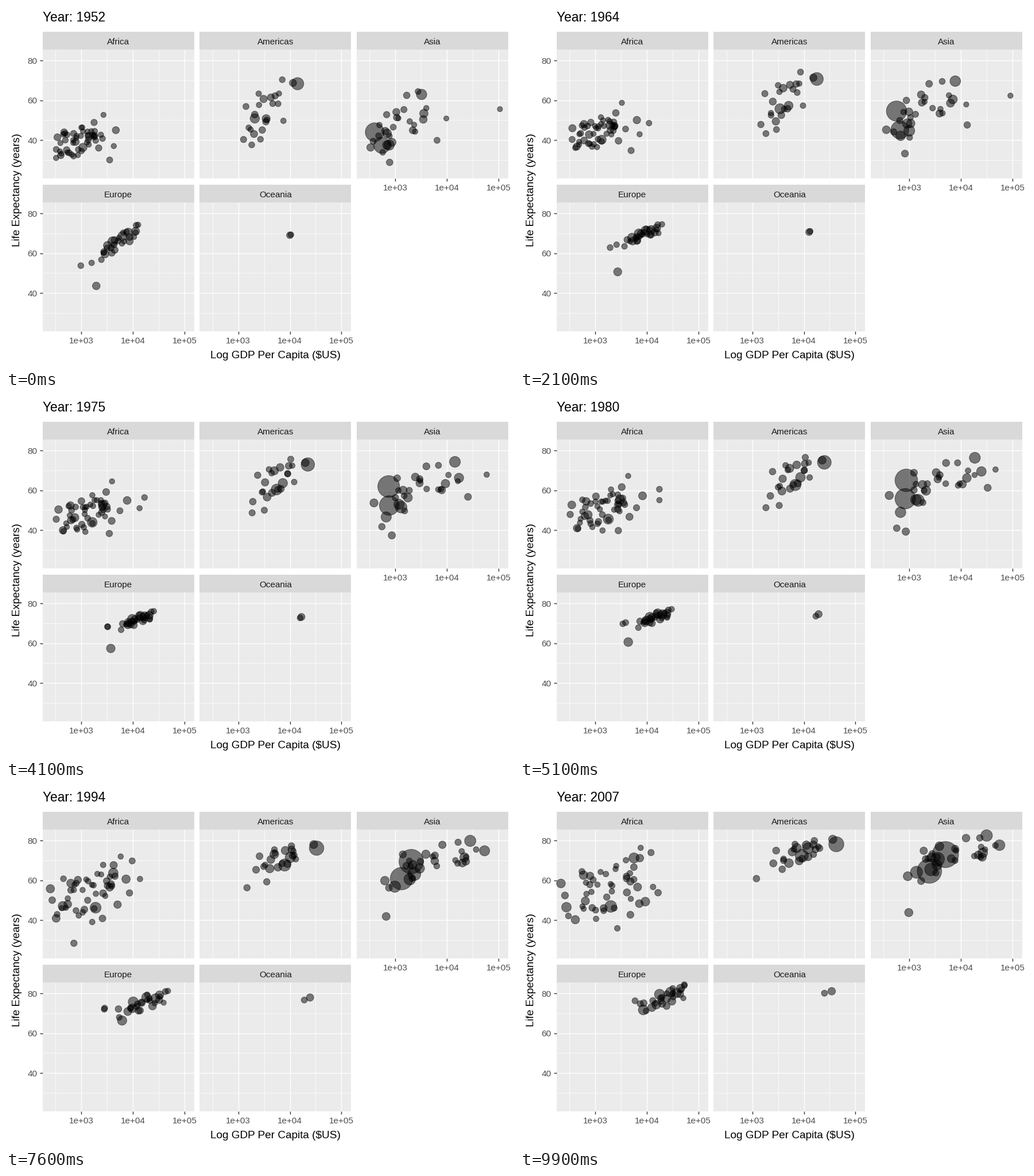
Recreate the animation shown at these times as a matplotlib script. Size 885x632 px, loop 10 s.

```python
import matplotlib.pyplot as plt
import numpy as np
from matplotlib.animation import FuncAnimation
from matplotlib.patches import Rectangle

W, H, DPI = 885, 632, 64
PT = 72 / DPI  # points per pixel
FRAMES = 100
PANEL_W, PANEL_H = 264, 224.7
LEFT, TOP, STEP_X, STEP_Y = 63.75, 76.2, 273.5, 267
STRIP = 31.6
LOG_MIN, DECADE = 2.2487, 89.8
LIFE_MAX, PER_YEAR = 85.553, 3.467
MAX_POP = 1318.7  # millions

rng = np.random.default_rng(5)
years = np.linspace(1952, 2007, FRAMES)
surveys = np.arange(1952, 2008, 5)
xs, ys, radii = [], [], []

plt.rcParams["font.family"] = "Liberation Sans"
fig = plt.figure(figsize=(W / DPI, H / DPI), dpi=DPI, facecolor="white")
ax = fig.add_axes([0, 0, 1, 1])
ax.set(xlim=(0, W), ylim=(H, 0))
ax.axis("off")


def map_x(col, log_gdp):
    return LEFT + col * STEP_X + (log_gdp - LOG_MIN) * DECADE


def map_y(row, life):
    return TOP + row * STEP_Y + (LIFE_MAX - life) * PER_YEAR


def text(x, y, s, size, color="black", ha="center", va="baseline", **kw):
    return ax.text(x, y, s, fontsize=size * PT, color=color, ha=ha, va=va, **kw)


def line(x, y, color, width, z):
    ax.plot(x, y, color=color, lw=width * PT, zorder=z, solid_capstyle="butt")


def box(x, y, w, h, color):
    ax.add_patch(Rectangle((x, y), w, h, fc=color, lw=0, zorder=0))


def x_ticks(col, row):
    bottom = TOP + row * STEP_Y + PANEL_H
    for power in (3, 4, 5):
        x = map_x(col, power)
        line([x, x], [bottom, bottom + 4.75], "#333333", 1.4, 2)
        text(x, bottom + 21, f"1e+0{power}", 15.2, "#4D4D4D")


def y_ticks(row):
    for life in (40, 60, 80):
        y = map_y(row, life)
        line([LEFT - 4.75, LEFT], [y, y], "#333333", 1.4, 2)
        text(54.7, y + 5.6, str(life), 15.2, "#4D4D4D", "right")


def over_time(values, end=FRAMES):
    """Spread a few values evenly over the loop and join them linearly."""
    return np.interp(years, np.linspace(1952, 2007, len(values)), values)


def radius(pop):
    return 0.615 + 1.852 * (2 + 10 * np.sqrt(pop / MAX_POP))


class Panel:
    def __init__(self, name, col, row):
        self.col, self.row = col, row
        left, top = LEFT + col * STEP_X, TOP + row * STEP_Y
        box(left, top, PANEL_W, PANEL_H, "#EBEBEB")
        box(left, top - STRIP, PANEL_W, STRIP, "#D9D9D9")
        text(left + PANEL_W / 2, top - 9.6, name, 15.2, "#1A1A1A")
        for width, shift in ((0.7, 0.5), (1.4, 0)):
            for power in (3, 4, 5):
                x = map_x(col, power - shift)
                line([x, x], [top, top + PANEL_H], "white", width, 1)
            for life in (40, 60, 80):
                y = map_y(row, life - 20 * shift)
                line([left, left + PANEL_W], [y, y], "white", width, 1)

    def dot(self, pops, log_gdp, life):
        """One bubble through evenly timed points."""
        xs.append(map_x(self.col, over_time(log_gdp)))
        ys.append(map_y(self.row, over_time(life)))
        radii.append(over_time(radius(np.array(pops))))

    def cloud(self, n, pops, growth, corr, gdp, gdp_sd, life, life_sd):
        """A seeded crowd whose centre and spread follow the given points."""
        spread = np.linspace(-1.75, 1.75, n)
        u, w = rng.permutation(spread), rng.permutation(spread)
        v = corr * u + np.sqrt(1 - corr ** 2) * w
        sizes = np.geomspace(*pops, n)
        for a, b, pop in zip(u, v, rng.permutation(sizes)):
            drift = rng.normal(0, 0.1, (2, len(surveys))).cumsum(axis=1)
            a, b = a + over_time(drift[0]), b + over_time(drift[1])
            xs.append(map_x(self.col, over_time(gdp) + a * over_time(gdp_sd)))
            ys.append(map_y(self.row, over_time(life) + b * over_time(life_sd)))
            radii.append(over_time(radius(np.array([pop, pop * growth]))))


africa = Panel("Africa", 0, 0)
americas = Panel("Americas", 1, 0)
asia = Panel("Asia", 2, 0)
europe = Panel("Europe", 0, 1)
oceania = Panel("Oceania", 1, 1)

# Crowds: size, population range and growth, GDP-life correlation,
# then centre and spread of log GDP and of life expectancy.
africa.cloud(43, (0.1, 12), 3.6, 0.4,
             (2.93, 3.05, 3.13, 3.1, 3.2), (0.25, 0.27, 0.32, 0.38, 0.42),
             (39.5, 45, 50.5, 53.5, 55), (4.3, 4.4, 5, 6.5, 8))
americas.cloud(19, (0.7, 18), 3, 0.55,
               (3.5, 3.64, 3.78, 3.79, 3.93), (0.22, 0.21, 0.2, 0.21, 0.23),
               (54, 61.5, 67, 71, 74), (7.5, 6, 4.8, 3.2, 2.9))
asia.cloud(21, (0.5, 35), 2.8, 0.65,
           (3.13, 3.35, 3.6, 3.75, 3.9), (0.27, 0.3, 0.36, 0.45, 0.45),
           (49, 58, 64.5, 70, 73), (7.5, 6.5, 5, 4.2, 4))
europe.cloud(27, (0.3, 65), 1.25, 0.9,
             (3.75, 3.98, 4.17, 4.23, 4.4), (0.21, 0.17, 0.15, 0.23, 0.19),
             (66, 70, 72.7, 75, 78), (3.8, 1.9, 1.7, 2.6, 2.6))

# Bubbles that stand out: population, log GDP, life expectancy.
africa.dot((33, 135), (3.03, 3.25, 3.3), (36.3, 45.5, 46.9))
africa.dot((14, 44), (3.67, 3.83, 3.92, 3.86, 3.97), (45, 51, 57, 61.5, 49.3))
africa.dot((1, 6), (3.38, 4.16, 4.26, 3.98, 4.08), (42.7, 49.6, 60, 69.5, 74))
africa.dot((0.4, 1.5), (3.63, 3.9, 4.25, 4.14, 4.12), (37, 44, 54.7, 61, 56.7))
africa.dot((2.5, 8.9), (2.69, 2.72, 2.9, 2.85, 2.94), (40, 44, 46, 27, 46.2))
africa.dot((4.2, 12.4), (3.55, 3.72, 3.45, 3.39, 3.68), (30, 35.6, 39.7, 40.7, 42.7))
africa.dot((0.3, 0.8), (3.43, 3.63, 3.88), (52.7, 67, 76.4))
africa.dot((22, 80), (3.15, 3.47, 3.75), (41.9, 55, 71.3))
africa.dot((14, 65), (2.89, 2.87, 2.44), (39.1, 47.8, 46.5))

americas.dot((158, 301), (4.15, 4.39, 4.63), (68.4, 74, 78.2))
americas.dot((57, 190), (3.32, 3.83, 3.96), (50.9, 62.4, 72.4))
americas.dot((30, 109), (3.54, 3.93, 4.08), (50.8, 66.3, 76.2))
americas.dot((15, 33), (4.06, 4.35, 4.56), (68.8, 75, 80.7))
americas.dot((3.2, 8.5), (3.26, 3.27, 3.08), (37.6, 51, 60.9))
americas.dot((2.9, 9.1), (3.43, 3.52, 3.58), (40.4, 52, 65.6))

asia.dot((556, 1319), (2.6, 2.78, 2.92, 3.28, 3.7), (44, 56.5, 64.8, 69.2, 73))
asia.dot((372, 1110), (2.74, 2.83, 2.91, 3.1, 3.39), (37.4, 46.5, 55.5, 60.6, 64.7))
asia.dot((82, 224), (2.88, 3.16, 3.55), (37.5, 54.5, 70.7))
asia.dot((86, 127), (3.51, 3.96, 4.26, 4.45, 4.5), (63, 70.9, 76.2, 79.7, 82.6))
asia.dot((0.2, 2.5), (5.03, 4.95, 4.68, 4.56, 4.67), (55.6, 63.6, 70.2, 75.4, 77.6))
asia.dot((8.4, 32), (2.89, 2.92, 2.94, 2.81, 2.99), (28.8, 34, 39.1, 41.7, 43.8))
asia.dot((4, 28), (3.81, 4.18, 4.53, 4.37, 4.34), (39.9, 49, 60.8, 69.3, 72.8))
asia.dot((47, 150), (2.84, 2.82, 3.14), (37.5, 48.5, 64.1))
asia.dot((41, 169), (2.84, 3.12, 3.42), (43.4, 55, 65.5))
asia.dot((0.1, 0.7), (3.99, 4.26, 4.47), (50.9, 67.5, 75.6))
asia.dot((20, 48), (2.52, 2.6, 2.97), (36.3, 57.3, 62.1))
asia.dot((4.7, 14), (2.57, 2.72, 2.75, 2.85, 3.23), (39.4, 45, 40, 56, 59.7))

europe.dot((22, 71), (3.29, 3.63, 3.93), (43.6, 60.3, 71.8))
europe.dot((1.3, 3.6), (3.2, 3.45, 3.54, 3.42, 3.77), (55.2, 66, 69.7, 71.8, 76.4))
europe.dot((2.8, 4.6), (2.99, 3.34, 3.6, 3.42, 3.87), (53.8, 64.5, 70.3, 72.5, 74.9))

oceania.dot((8.7, 20.4), (4, 4.12, 4.28, 4.38, 4.54), (69.1, 71, 74.5, 77.8, 81.2))
oceania.dot((2, 4.1), (4.02, 4.14, 4.23, 4.27, 4.4), (69.4, 71.4, 73.5, 76.5, 80.2))

for col, row in ((2, 0), (0, 1), (1, 1)):
    x_ticks(col, row)
y_ticks(0)
y_ticks(1)
text(469.7, 615, r"Log GDP Per Capita (\$US)", 19)
text(28, 321, "Life Expectancy (years)", 19, ha="right", va="center", rotation=90)
title = text(LEFT, 27.2, "", 22.8, ha="left")

xs, ys = np.array(xs), np.array(ys)
areas = (2 * np.array(radii) * PT) ** 2
dots = ax.scatter(xs[:, 0], ys[:, 0], s=areas[:, 0], zorder=3, lw=PT,
                  fc=(0, 0, 0, 0.5), ec=(0, 0, 0, 0.5))


def draw(i):
    dots.set_offsets(np.column_stack([xs[:, i], ys[:, i]]))
    dots.set_sizes(areas[:, i])
    title.set_text(f"Year: {round(years[i])}")
    return dots, title


anim = FuncAnimation(fig, draw, frames=FRAMES, interval=100, repeat=True)
plt.show()
```
